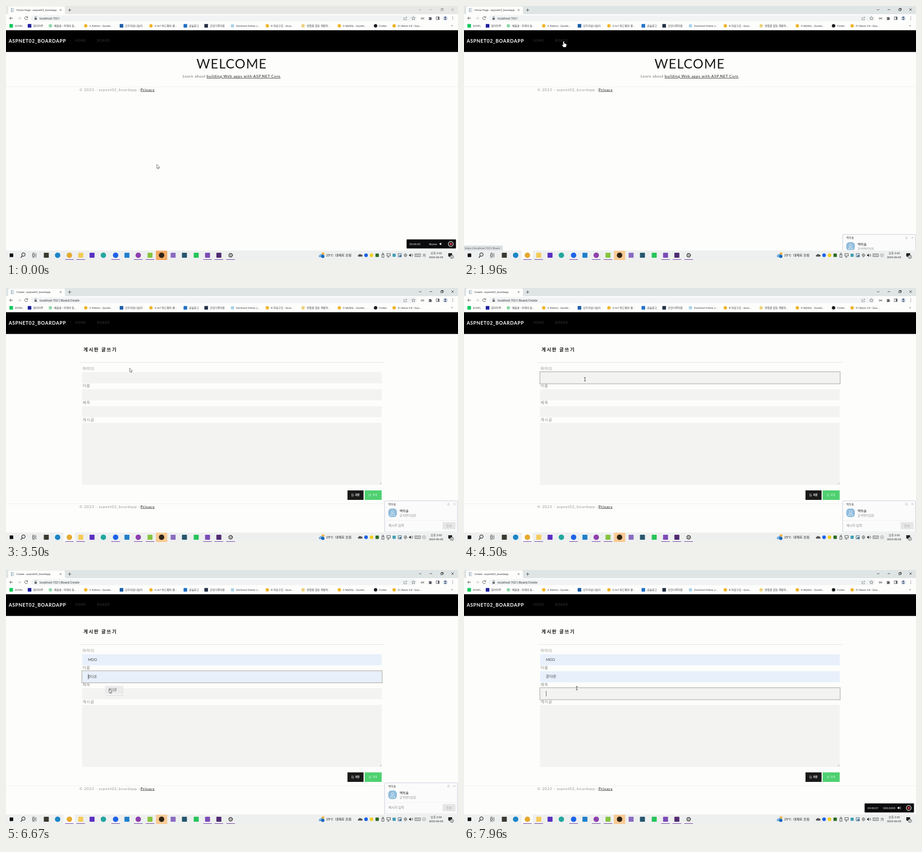
Animation, 998 px wide and 561 px high, one loop 8000 ms. Source, as an HTML page:

```html
<!DOCTYPE html>
<html lang="ko">
<head>
<meta charset="utf-8">
<title>Board app</title>
<style>
html, body { margin: 0; width: 100%; height: 100%; overflow: hidden; background: #fdfdfb; }
svg { display: block; width: 100vw; height: 100vh; }
text { font-family: Roboto, 'Noto Sans CJK KR', 'Noto Sans CJK JP', sans-serif; white-space: pre; }
.site text { font-family: Lato, 'Noto Sans CJK KR', 'Noto Sans CJK JP', sans-serif; text-decoration-thickness: .7px; }
</style>
</head>
<body>
<svg id="stage" viewBox="0 0 998 561" preserveAspectRatio="none"></svg>
<script>
const LOOP = 8000;
const PERSON = '문다온', LOGIN = 'MDO', SENDER = '백하솔';

const rect = (x, y, w, h, fill, more = '') =>
  `<rect x="${x}" y="${y}" width="${w}" height="${h}" fill="${fill}" ${more}/>`;
const disc = (x, y, r, fill, more = '') => `<circle cx="${x}" cy="${y}" r="${r}" fill="${fill}" ${more}/>`;
const line = (d, color, width = 1, more = '') =>
  `<path d="${d}" fill="none" stroke="${color}" stroke-width="${width}" ${more}/>`;
const shape = (d, fill, more = '') => `<path d="${d}" fill="${fill}" ${more}/>`;
const text = (x, y, s, size, fill = '#444', more = '') =>
  `<text x="${x}" y="${y}" font-size="${size}" fill="${fill}" ${more}>${s}</text>`;
const spaced = n => `letter-spacing="${n}"`;
const group = (id, content, more = '') => `<g id="${id}" ${more}>${content}</g>`;
const tile = (x, y, size, fill) => rect(x - size / 2, y - size / 2, size, size, fill, 'rx="1"');
const cross = (x, y, r, color) =>
  line(`M${x - r} ${y - r}l${2 * r} ${2 * r}m0 ${-2 * r}l${-2 * r} ${2 * r}`, color, .8);

function browser() {
  const grey = '#5f6368';
  const bookmarks = [
    [11.5, 's', '#12c75e', 'ZUVEL'], [52, 's', '#2020a0', '일터마루'], [98, 'c', '#8fd8a8', '배움솔 - 미래의 동...'],
    [176, 'c', '#f2b52a', 'A Python - Quorbi...'], [255, 's', '#1f5fa8', '모두자료나눔터'],
    [320, 'c', '#f2b52a', 'G IoT 하드웨어 클...'], [396, 's', '#2474c8', '글숲문고'], [442, 's', '#263247', '코딩다락마을'],
    [500, 'c', '#a9d3ea', 'Dorimsol Online J...'], [577, 'c', '#f2b52a', 'B 자료구조 - Quor...'],
    [656, 'c', '#ecd27a', '면접을 앞둔 개발자...'], [736, 'c', '#f2b52a', 'D MySQL - Quorbi...'],
    [816, 'c', '#1b1f23', 'Forbix'], [857, 'c', '#f2b52a', '01.Basic C# - Quo...']
  ].map(([x, kind, color, label]) =>
    (kind === 's' ? tile(x, 43.7, 8, color) : disc(x, 43.7, 3.8, color)) +
    text(x + 8, 46, label, 6, '#3c4043')).join('');

  return rect(0, 0, 998, 18, '', 'id="strip"') + rect(0, 18, 998, 35.5, '#fdfdfc') +
    shape('M2 18q3 0 3-3V4q0-3 3-3h119q3 0 3 3v11q0 3 3 3z', '#fdfdfc') +
    rect(11, 5, 6, 8, '#eef1f2', 'stroke="#9aa7ad" stroke-width=".6"') + line('M13 5v8', '#4a91a8', .8) +
    `<svg x="0" y="0" width="112" height="18">${text(23, 11, '', 6, '#3c4043', 'id="title"')}</svg>` +
    cross(120.5, 9, 1.8, '#3c4043') + line('M137 9h7M140.500 5.500v7', '#3c4043', .9) +
    group('controls', line('M912 7l2.500 2.500l2.500-2.500M935.500 8h5M960 6.500h4v4h-4zM961.500 6.500v-1.200h4v4h-1.200M983.500 5.500l5 5m0-5l-5 5', '#222', .9)) +
    line('M15 27H8m3-3l-3 3l3 3', '#444', 1) + line('M26 27h7m-3-3l3 3l-3 3', '#bbb', 1) +
    line('M47.300 25a3.300 3.300 0 1 0 .3 3M47.800 23v2.500h-2.500', '#444', 1) +
    rect(55, 20.5, 852, 13, '#f1f3f4', 'rx="6.5"') +
    rect(63, 26.3, 5, 4, grey) + line('M64 26v-1.500a1.500 1.500 0 0 1 3 0V26', grey, .8) +
    text(74, 29.6, '', 6.8, '#3c4043', 'id="url"') +
    line('M880 25.500h-1.500v5h6v-2M881 28q.5-3 4-3m-1.500-1.700l1.700 1.700l-1.700 1.700', grey, .7) +
    line('M899.500 23.200l1.200 2.500l2.800.3l-2.100 1.900l.6 2.700l-2.500-1.400l-2.500 1.400l.6-2.700l-2.100-1.900l2.800-.3z', grey, .8) +
    text(916, 29.3, '(x)', 6, '#333', 'font-weight="700"') +
    shape('M933.500 25h2a1 1 0 0 1 2 0h2v2a1 1 0 0 1 0 2v2h-6v-2a1 1 0 0 0 0-2z', grey) +
    rect(950, 24, 6.5, 6, 'none', `stroke="${grey}"`) + rect(953.5, 24, 3, 6, grey) +
    disc(970, 27, 5, '#c9d3e4') + disc(970, 25.3, 1.7, '#46536b') + shape('M966.800 30.300q3.200-4 6.400 0z', '#46536b') +
    [24, 27, 30].map(y => disc(986.5, y, .8, grey)).join('') +
    bookmarks + text(983, 46, '»', 7, '#444');
}

function navbar() {
  return rect(0, 53.5, 998, 48, '#000') +
    text(6, 80.8, 'ASPNET02_BOARDAPP', 10.4, '#fff', `font-weight="700" ${spaced(.8)}`) +
    text(153, 79.4, 'HOME', 6.8, '#2b2b2e', `font-weight="700" ${spaced(.8)}`) +
    text(201.5, 79.4, 'BOARD', 6.8, '#2b2b2e', `font-weight="700" ${spaced(.9)}`);
}

const footer = y => line(`M0 ${y}H998`, '#efefec') +
  text(162, y + 9, '© 2023 - aspnet02_boardapp -', 8.3, '#919191', spaced(.76)) +
  text(297, y + 9, 'Privacy', 8.3, '#1a1a1a', `${spaced(.7)} text-decoration="underline"`);

function homePage() {
  return text(420.5, 137.5, 'WELCOME', 29, '#1a1a1a', spaced(1.3)) +
    text(390, 158, 'Learn about', 8.3, '#666', spaced(.7)) +
    text(443, 158, 'building Web apps with ASP.NET Core', 8.3, '#1a1a1a', `${spaced(.7)} text-decoration="underline"`) +
    text(605.5, 158, '.', 8.3, '#666') + footer(178.5);
}

const fieldTop = [186, 223.5, 261];

function createPage() {
  const labels = ['아이디', '이름', '제목', '게시글'];
  return text(171, 139.7, '게시판 글쓰기', 10.4, '#1a1a1a', `font-weight="700" ${spaced(2.1)}`) +
    line('M163 164.500H836', '#e2e2e2') +
    labels.map((s, i) => text(169, 181.3 + 37.5 * i, s, 8.5, '#8a8a8a', spaced(.8))).join('') +
    fieldTop.map((y, i) => rect(168, y, 661.5, 24.5, '#f3f3f1', `id="field${i}"`)).join('') +
    rect(168, 298, 661.5, 137, '#f3f3f1') + line('M825 433.500l4-4M827.500 433.500l1.500-1.500', '#888', .6) +
    rect(167.5, 0, 663, 26.5, 'none', 'id="ring" stroke="#c5c5c2" stroke-width="2"') +
    text(181, 200.6, LOGIN, 8, '#444', 'id="login"') +
    text(181, 238.3, PERSON, 8.3, '#444', 'id="person"') +
    line('M181.500 0v12', '#333', .8, 'id="caret"') +
    rect(754, 447, 35.5, 21, '#1a1a1a') + rect(792, 447, 37.5, 21, '#4fd070') +
    line('M763.500 454.700h2.500l1.300 1.300v3.800h-3.800zM764.500 457.500h2', '#fff', .6) +
    text(771, 459.2, '저장', 5.2, '#fff', 'font-weight="700"') +
    line('M800.500 455.500h1m1 0h3.500M800.500 457.500h1m1 0h3.500M800.500 459.500h1m1 0h3.500', '#d6f7df', .7) +
    text(809.5, 459.2, '목록', 5.2, '#e2faea', spaced(.4)) + footer(476.5);
}

function dropdown(id, y, width, label) {
  return group(id, rect(219.5, y + .8, width, 22.5, '#000', 'rx="1.5" opacity=".13"') +
    shape(`M227 ${y}l3-3l3 3z`, '#fff') +
    rect(219, y, width, 22, '#fff', 'rx="1.5" stroke="#e4e4e4" stroke-width=".5"') +
    rect(219, y + 2, width, 18, '#ebebeb', `id="${id}Hover"`) +
    text(226, y + 13, label, 6.8, '#444'));
}

function taskbar() {
  const apps = [
    [89, 's', '#3b3a30'], [114, 'c', '#1b86c8'], [140, 'c', '#e5a92f'], [165, 's', '#f5cb58'], [190, 's', '#5a2fc2'],
    [215, 'c', '#22a6a0'], [242, 'c', '#1d63e8'], [267, 's', '#1f80cc'], [292, 'c', '#8f3fae'], [318, 's', '#86c440'],
    [343.5, 'c', '#2f2417'], [369, 's', '#8a6bc0'], [394, 's', '#27566f'], [420, 's', '#25c45a'], [445, 's', '#7c4bb8'], [470, 's', '#512a72']
  ].map(([x, kind, color]) => kind === 's' ? tile(x, 550.5, 11, color) : disc(x, 550.5, 6, color)).join('');
  const running = [140, 165, 242, 292, 318, 445, 470, 496].map(x => rect(x - 9.5, 559.5, 19, 1.5, '#8a63b8')).join('');
  const ink = '#333';
  const gear = disc(496, 550.5, 3.3, 'none', `stroke="${ink}" stroke-width="1.2"`) + disc(496, 550.5, 1.1, ink) +
    disc(496, 550.5, 4.5, 'none', `stroke="${ink}" stroke-width="1.3" stroke-dasharray="1.77 1.77"`);

  return rect(0, 540, 998, 21, '#eef0ef') + rect(127, 540, 25, 21, '#fff', 'id="active" opacity=".75"') +
    rect(331, 540.5, 25, 20.5, '', 'id="alert"') + tile(12, 550.5, 8, '#111') +
    disc(38.5, 549, 3.7, 'none', 'stroke="#111" stroke-width="1.2"') + line('M36 552l-3.500 4', '#111', 1.3) +
    line('M58 546h5.500M58 555h5.500M58.500 548.500h4.500v4h-4.500zM66 546v9', '#222', .9) +
    apps + gear + running +
    disc(700, 547, 3, '#f3b13c') + shape('M692 555a3 3 0 0 1 1-5.500a4 4 0 0 1 7 0a2.800 2.800 0 0 1 1 5.500z', '#74aee0') +
    disc(699.5, 553, 3.6, '#1767b8') + text(707, 553, '25°C', 7.2, '#222') + text(727, 553, '대체로 흐림', 7.4, '#222') +
    shape('M778 553.500a2 2 0 0 1 .8-3.800a3 3 0 0 1 5.500-.4a2.200 2.200 0 0 1 1.500 4.200z', '#555') +
    disc(795, 550.5, 4, '#1d63e8') + disc(807, 550.5, 4, '#f0ce22') + tile(819.5, 550.5, 7.5, '#2b6a24') +
    rect(830, 549, 4.5, 6, 'none', 'stroke="#333" stroke-width=".9"') + line('M831 549v-3h2.500v3', ink, .8) +
    rect(841, 547, 7.5, 5, 'none', 'stroke="#333" stroke-width=".9"') + line('M842 555h4m-2 0v-3', ink, .8) +
    tile(857, 550.5, 7, '#3e9fb8') + rect(866, 547, 7, 7, 'none', 'stroke="#345a78"') + tile(870.5, 552, 4, '#3e6f9a') +
    disc(882, 550.5, 3.1, 'none', 'stroke="#444" stroke-width=".8"') + line('M882 546v9M879 550.500h6', ink, .6) +
    shape('M890 549h1.700l2.300-2.200v7.400l-2.300-2.200H890z', ink) + line('M895.500 548.500q1.500 2 0 4M897 547.300q2.500 3.200 0 6.400', ink, .7) +
    rect(903, 547.5, 12, 6, 'none', 'stroke="#444" stroke-width=".8"') +
    line('M904.500 549.500h9M904.500 551.500h9', ink, .8, 'stroke-dasharray="1 .7"') +
    group('imeOn', text(919, 553.5, '가', 8.5, '#222')) +
    group('imeOff', disc(923, 550.5, 3.7, 'none', 'stroke="#888" stroke-width=".8"') + cross(923, 550.5, 1.7, '#888')) +
    text(950, 548.2, '오후 2:02', 6.2, '#222', 'text-anchor="middle"') +
    text(949.5, 557.3, '2023-06-05', 6.2, '#222', 'text-anchor="middle"') +
    shape('M976.500 546h8.500v7h-5l-2 2v-2h-1.500z', '#222') + disc(984.5, 554, 3.7, '#eef0ef', 'stroke="#222" stroke-width=".8"') +
    text(984.5, 556.2, '2', 6, '#222', 'text-anchor="middle"');
}

function recorder() {
  return rect(884.5, 515.5, 109, 20, '#0b0b0d', 'rx="1"') +
    text(891, 527.7, '', 6.2, '#eee', 'id="clock"') + text(952, 527.7, '', 6.2, '#eee', 'id="size" text-anchor="end"') +
    shape('M957 524.500h1.500l2.500-2v6l-2.500-2h-1.500z', '#fff') +
    line('M962 523.500q1.500 2 0 4M963.300 522.500q2.300 3 0 6', '#fff', .6, 'id="sound"') +
    disc(982, 525.5, 5.4, 'none', 'stroke="#fff" stroke-width="1.2"') +
    rect(979.7, 523.2, 4.6, 4.6, '#e23a44', 'id="record" rx=".6"');
}

function popup() {
  return rect(836, 470, 161, 69, '#fbfbfc', 'rx="1.5" stroke="#c3c8d6"') +
    text(844, 479.7, SENDER, 6.1, '#444') +
    line('M974.500 479h5l-1-1.300v-1.500a1.500 1.500 0 0 0-3 0v1.500zM976.500 480.200h1', '#aaa', .6) + cross(990, 477.3, 2, '#aaa') +
    rect(844, 487, 19, 19, '#90bddc', 'rx="7"') +
    disc(853.5, 494.4, 2.7, 'none', 'stroke="#e8f3fa"') + line('M848.800 502q0-4 4.700-4t4.700 4z', '#e8f3fa') +
    text(869, 494.7, SENDER, 7.2, '#222') + text(869, 504.5, '갈색펜이었음', 6.6, '#999') +
    line('M837 513.500h159', '#ececf0', .8) + text(844.5, 527.3, '메시지 입력', 7.1, '#888') +
    rect(964, 517, 28.5, 16, '#e6e6e6', 'rx="1.5"') + text(978, 527.5, '전송', 7, '#aaa', 'text-anchor="middle"');
}

function cursors() {
  const outline = 'stroke="#333" stroke-width=".7" stroke-linejoin="round"';
  return group('arrow', shape('M0 0v8.800l2-1.800l1.400 3l1.500-.7l-1.400-2.900h2.700z', '#fff', outline)) +
    group('hand', shape('M-1.200 .8q1.200-1.600 2.400 0v4q1-.6 1.800.3q1-.5 1.700.4q1.300-.2 1.500 1v3.200l-1.200 3.300H-.5l-3.200-4.800q.4-1.500 2.500 0z', '#fff', outline)) +
    group('beam', line('M-2-4q2 0 2 1q0-1 2-1M0-3.500v7M-2 4q2 0 2-1q0 1 2 1', '#333', .9));
}

document.getElementById('stage').innerHTML =
  '<clipPath id="desk"><rect width="998" height="539"/></clipPath>' +
  rect(0, 0, 998, 561, '#fdfdfb') + browser() +
  `<g class="site">${navbar()}${group('home', homePage())}${group('create', createPage())}</g>` +
  dropdown('loginList', 216, 32, LOGIN) + dropdown('personList', 254, 39, PERSON) +
  group('status', rect(0, 529, 0, 11, '#dee1e4', 'id="statusBox"') + text(2, 537, '', 6, '#5f6368', 'id="link"')) +
  group('recorder', recorder()) + `<g clip-path="url(#desk)">${group('popup', popup())}</g>` +
  taskbar() + group('cursor', cursors());

const el = {};
document.querySelectorAll('[id]').forEach(node => el[node.id] = node);
const show = (id, on) => el[id].style.display = on ? '' : 'none';
const set = (id, attr, value) => el[id].setAttribute(attr, value);

// time, x, y, cursor kind from that time on
const route = [
  [0, 333, 350, 'arrow'], [300, 333, 350, 'arrow'], [900, 170, 79, 'hand'], [1500, 170, 79, 'arrow'],
  [1800, 220, 78, 'hand'], [2300, 220, 78, 'arrow'], [3400, 273, 176, 'arrow'], [3550, 273, 177, 'arrow'],
  [3800, 267, 200, 'beam'], [5450, 267, 204, 'arrow'], [5750, 235, 227, 'arrow'], [5900, 235, 227, 'arrow'],
  [6150, 245, 238, 'beam'], [6300, 245, 238, 'arrow'], [6550, 228, 263, 'arrow'], [6950, 228, 263, 'arrow'],
  [7250, 248, 268, 'beam'], [7600, 248, 268, 'beam'], [7900, 249, 261, 'beam'], [LOOP, 249, 261, 'beam']
];
const focusTimes = [3900, 6250, 7500];
const loginPreview = 5650, loginPicked = 5880, personPreview = 6520, personPicked = 6930;
const pageChange = 2900, popupStart = 1880, popupEnd = 7000;

function moveCursor(t) {
  const i = route.findIndex(p => p[0] > t) - 1;
  const [t0, x0, y0, kind] = route[i], [t1, x1, y1] = route[i + 1];
  const u = (t - t0) / (t1 - t0), e = u * u * (3 - 2 * u);
  set('cursor', 'transform', `translate(${x0 + (x1 - x0) * e} ${y0 + (y1 - y0) * e})`);
  for (const k of ['arrow', 'hand', 'beam']) show(k, k === kind);
}

function render(now) {
  const t = now % LOOP;
  const within = (a, b) => t >= a && t < b;
  const creating = t >= pageChange, windowFocused = t >= 1200;

  show('home', !creating);
  show('create', creating);
  el.title.textContent = (creating ? 'Create' : 'Home Page') + ' - aspnet02_boardapp';
  el.url.textContent = 'localhost:7021' + (creating ? '/Board/Create' : '');
  set('strip', 'fill', windowFocused ? '#dfe4e4' : '#e7e8e6');
  set('controls', 'opacity', windowFocused ? 1 : .4);
  set('alert', 'fill', t < 500 ? '#f5a963' : '#f9ca94');
  show('active', windowFocused);

  const overBoard = within(1750, 2300);
  show('status', overBoard || within(900, 1600));
  set('statusBox', 'width', overBoard ? 86 : 67);
  el.link.textContent = 'https://localhost:7021' + (overBoard ? '/Board' : '');

  const focus = focusTimes.filter(f => f <= t).length - 1;
  show('ring', focus >= 0);
  show('caret', focus >= 0 && (t - focusTimes[focus]) % 1060 < 530);
  if (focus >= 0) {
    set('ring', 'y', fieldTop[focus] - 1);
    set('caret', 'transform', `translate(0 ${fieldTop[focus] + 6})`);
  }
  const previewing = within(personPreview, personPicked);
  show('loginList', within(4700, loginPicked));
  show('loginListHover', t >= loginPreview);
  show('personList', within(6300, personPicked));
  show('personListHover', previewing);
  show('login', t >= loginPreview);
  show('person', t >= personPreview);
  set('person', 'font-size', previewing ? 7.2 : 8.3);
  set('field0', 'fill', t >= loginPreview ? '#e8f0fc' : '#f3f3f1');
  set('field1', 'fill', t >= personPreview ? '#e8f0fc' : '#f3f3f1');

  const notified = within(popupStart, popupEnd);
  show('popup', notified);
  set('popup', 'transform', `translate(0 ${70 * Math.max(0, 1 - (t - popupStart) / 160)})`);
  show('imeOn', !notified);
  show('imeOff', notified);

  const tick = Math.floor(t / 500);
  show('recorder', !notified);
  el.clock.textContent = '00:00:0' + Math.floor(Math.max(0, t - 100) / 1000);
  el.size.textContent = tick ? (92.06 + (tick - 2) * 62.766).toFixed(2) + 'KB' : '0bytes';
  set('record', 'opacity', (1 + Math.cos(Math.PI * t / 1000)) / 2);
  show('sound', t >= popupEnd);

  moveCursor(t);
  requestAnimationFrame(render);
}
requestAnimationFrame(render);
</script>
</body>
</html>
```
